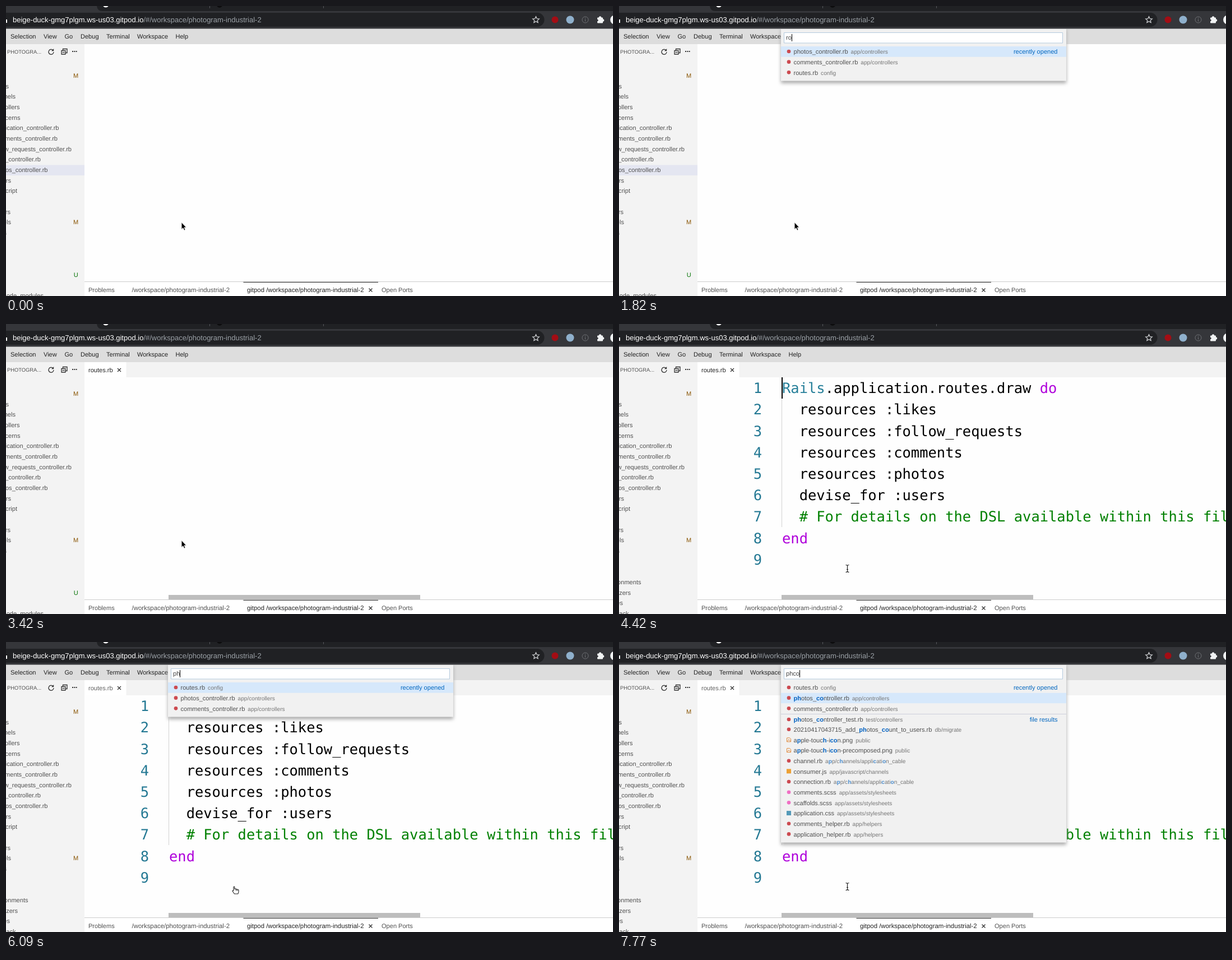
These frames come from a looping animation (1083x517 px, 8000 ms). An HTML page:

```html
<!DOCTYPE html>
<html lang="en">
<head>
<meta charset="utf-8">
<title>Quick open</title>
<style>
  html, body { margin: 0; width: 100%; height: 100%; overflow: hidden; background: #fff; }
  svg { display: block; }
  text { font: 11.06px "Liberation Sans", Arial, sans-serif; text-rendering: geometricPrecision; white-space: pre; }
  .end { text-anchor: end; }
  .menu { fill: #222; }
  .tree, .name { fill: #505050; }
  .desc { font-size: 10.12px; fill: #767676; }
  .hit { fill: #0060c0; font-weight: bold; }
  .desc .hit { fill: #4a8ccc; }
  .group { fill: #0066bf; text-anchor: end; }
  .path { font-size: 11.38px; }
  .url { font-size: 13px; fill: #9aa0a6; }
  .code { font: 25.46px "DejaVu Sans Mono", monospace; }
  .popup { filter: drop-shadow(0 4px 3.4px #a8a8a8); }
</style>
</head>
<body>
<svg id="stage" width="1083" height="517" viewBox="0 0 1083 517">
  <defs>
    <clipPath id="below"><path d="M0 41H1083V517H0z"/></clipPath>
    <clipPath id="side"><path d="M0 68H140V517H0z"/></clipPath>
    <path id="x" d="M-3-3L3 3M3-3L-3 3" stroke="#333" stroke-width="1.3"/>
  </defs>

  <!-- browser bar -->
  <path fill="#35363a" d="M0 0H1083V41H0z"/>
  <path fill="#202124" d="M168 0H1083V9H172Q163 9 162 0z"/>
  <circle cx="178" cy="-3" r="5.5" fill="#fff"/>
  <circle cx="381" cy="-2" r="5" fill="#0d0d0e"/>
  <path stroke="#55575b" d="M363.5 0V4M566.5 0V4"/>
  <path fill="#202124" d="M0 12H948A12.5 12.5 0 0 1 948 37H0z"/>
  <path fill="#fff" d="M0 24H2V30H0z"/>
  <text x="12" y="29" class="url"><tspan fill="#fff">beige-duck-gmg7plgm.ws-us03.gitpod.io</tspan>/#/workspace/photogram-industrial-2</text>
  <path fill="none" stroke="#d5d7da" stroke-width="1.2" d="M945.500 18.700l1.700 3.800 4.100.400-3.100 2.700.9 4-3.600-2.100-3.600 2.100.9-4-3.100-2.700 4.100-.4z"/>
  <circle cx="979.500" cy="24.500" r="6" fill="#a30d14"/>
  <circle cx="1006.500" cy="24.500" r="7" fill="#8fb0cc"/>
  <g fill="none" stroke="#707276"><circle cx="1033.500" cy="24.500" r="5.500"/><path d="M1033.500 23.500V27.500M1033.500 21V22.200"/></g>
  <g fill="#f1f3f4"><rect x="1055" y="20.500" width="10" height="10" rx="1"/><circle cx="1060" cy="20.500" r="2.200"/><circle cx="1065" cy="25.500" r="2.200"/><circle cx="1086" cy="24.500" r="8"/></g>
  <circle cx="1055" cy="25.500" r="1.700" fill="#35363a"/>

  <!-- workbench -->
  <path fill="#ddd" d="M0 40.500H1083V68H0z"/>
  <g id="menu"></g>
  <path fill="#f3f3f3" d="M0 68H140V517H0z"/>
  <path fill="#fefefe" d="M140 68H1083V517H140z"/>
  <g id="tree" clip-path="url(#side)">
    <path id="picked" fill="#e4e6f1" d="M0 283.500H140V302H0z"/>
    <text x="2" y="85" class="tree" style="font-size:9.350px">PHOTOGRA...</text>
    <g fill="none" stroke="#333" stroke-width="1.300">
      <path d="M83.500 78.500A4.500 4.500 0 1 0 85 82"/>
      <path d="M99 79.500H106V86H99zM101.500 79V76.500H109V83.500H106.500M100.500 82.700H104.500"/>
    </g>
    <path fill="#333" d="M85.200 76V80.300H81zM118 80h2v2h-2zM121.300 80h2v2h-2zM124.600 80h2v2h-2z"/>
  </g>
  <g id="editor">
    <path fill="#f3f3f3" d="M140 68H1083V95H140z"/>
    <path fill="#fff" d="M140 68H214.500V95H140z"/>
    <text id="tab" x="147" y="86">routes.rb</text>
    <use href="#x" x="202" y="82"/>
    <g id="code"><path stroke="#d3d3d3" d="M290.500 133V362"/></g>
    <path id="caret" d="M290 95H292V133H290z"/>
    <path id="scroll" fill="#bdbdbd" d="M290 483H739V491H290z"/>
  </g>
  <path fill="#fff" d="M140 492H1083V517H140z"/>
  <path stroke="#ccc" d="M140 491.500H1083"/>
  <path stroke="#333" d="M423.500 492.500H664"/>
  <g id="panel"></g>
  <use href="#x" x="650.500" y="506.500"/>

  <g clip-path="url(#below)"><g id="popup"></g></g>

  <g id="arrow" transform="translate(313 386)">
    <path stroke="#fff" d="M0-.500V12.500L2.900 9.700 4.900 14.200 7.100 13.200 5.100 8.900H9z"/>
  </g>
  <g id="beam" fill="none">
    <path id="stem" stroke="#fff" stroke-width="3" d="M-3-6.500Q0-6.500 0-4.500Q0-6.500 3-6.500M0-5V5M-3 6.500Q0 6.500 0 4.500Q0 6.500 3 6.500M-1.500 1.500H1.500"/>
    <path stroke="#222" stroke-width="1.200" d="M-3-6.500Q0-6.500 0-4.500Q0-6.500 3-6.500M0-5V5M-3 6.500Q0 6.500 0 4.500Q0 6.500 3 6.500M-1.500 1.500H1.500"/>
  </g>
  <g id="hand" transform="translate(409.500 442)">
    <path fill="#fff" stroke="#222" stroke-width="1.100" stroke-linejoin="round" d="M-3.500 1.500V-5Q-2.500-7-1.500-5V-1.500Q0-2.800 1-1.200Q2.400-2.200 3.300-.600Q5.500-1.200 5.500 1V3.500Q5.300 5 4.300 7H-2L-5.500 2Q-5.500.300-3.500 1.500M1-1V1.500M3.300-.500V1.500"/>
  </g>
</svg>
<script>
const LOOP = 8000, ROW = 18.67;
const $ = id => document.getElementById(id);
const text = (x, y, s, cls = '', extra = '') => `<text x="${x}" y="${y}" class="${cls}" ${extra}>${s}</text>`;
const add = (id, html) => $(id).insertAdjacentHTML('beforeend', html);
const show = (id, on) => $(id).style.display = on ? '' : 'none';
// value of the last step that has begun
const at = (t, steps) => steps.reduce((v, s) => t >= s[0] ? s[1] : v, steps[0][1]);

// menu, bottom panel
[[8, 'Selection'], [67, 'View'], [104.5, 'Go'], [133, 'Debug'], [179, 'Terminal'], [234, 'Workspace'], [302.5, 'Help']]
  .forEach(([x, s]) => add('menu', text(x, 58, s, 'menu')));
add('panel', text(147, 510, 'Problems', 'tree')
  + text(224.5, 510, '/workspace/photogram-industrial-2', 'tree path')
  + text(430, 510, 'gitpod /workspace/photogram-industrial-2', 'menu path')
  + text(670, 510, 'Open Ports', 'tree'));

// file tree: row, right edge, label
const branch = rows => rows.map(([i, x, s]) => text(x, 128 + i * ROW, s, 'tree end')).join('');
const mark = (i, s, color) => text(124.7, 128 + i * ROW, s, '', `text-anchor="middle" fill="${color}"`);
add('tree', branch([[1, 5, 'assets'], [2, 17, 'channels'], [3, 24.5, 'controllers'], [4, 25.5, 'concerns'],
  [5, 94.5, 'application_controller.rb'], [6, 92, 'comments_controller.rb'], [7, 117, 'follow_requests_controller.rb'],
  [8, 62, 'likes_controller.rb'], [9, 74.5, 'photos_controller.rb'], [10, 9, 'helpers'], [11, 20, 'javascript'],
  [13, 8, 'mailers'], [14, 9, 'models'], [15, 1, 'views']])
  + mark(0, 'M', '#895503') + mark(14, 'M', '#895503')
  + `<g id="shut">${branch([[21, 67, 'node_modules']])}${mark(19, 'U', '#007100')}</g>`
  + `<g id="open">${branch([[18, 39.5, 'environments'], [19, 21, 'initializers'], [20, 7, 'locales'], [21, 17.5, 'webpack']])}</g>`);

// code
const ink = (color, s) => `<tspan fill="${color}">${s}</tspan>`;
[ink('#267f99', 'Rails') + '.application.routes.draw ' + ink('#af00db', 'do'),
  '  resources :likes', '  resources :follow_requests', '  resources :comments', '  resources :photos',
  '  devise_for :users', ink('#008000', '  # For details on the DSL available within this file, see'),
  ink('#af00db', 'end'), ''].forEach((line, i) => {
  const y = 123.2 + i * 38.19;
  add('code', text(255, y, i + 1, 'code end', 'fill="#237893"') + text(291, y, line, 'code'));
});

// popup rows: icon, name, folder; stars enclose matched letters
const ctl = 'app/controllers', css = 'app/assets/stylesheets', help = 'app/helpers';
const photos = 'r photos_controller.rb ' + ctl, comments = 'r comments_controller.rb ' + ctl, routes = 'r routes.rb config';
const cable = 'a*p*p/c*h*annels/appli*c*ation_cable', cableCo = 'a*p*p/c*h*annels/appli*c*ati*o*n_cable';
const lists = {
  first: [photos, comments, routes],
  rout: [photos, comments, 'r *rout*es.rb config', 'r p*ro*d*u*c*t*ion.rb config/environments',
    'j p*ro*d*u*c*t*ion.js config/webpack', 'r 20210417042205_c*r*eate_f*o*llow_req*u*es*t*s.rb db/migrate',
    'r 20210415144947_c*r*eate_f*o*llow_req*u*es*t*s.rb public/example_migrations',
    'y follow_requests.yml test/fixtures', 'r follow_requests_helper.rb ' + help,
    'r content_security_policy.rb config/initializers', 'r follow_requests_controller.rb ' + ctl,
    'b _follow_request.json.jbuilder app/views/follow_requests',
    'r follow_requests_controller_test.rb test/controllers', 'r 20210417043715_add_photos_count_to_users.rb db/migrate'],
  second: [routes, photos, comments],
  ph: [routes, 'r *ph*otos_controller.rb ' + ctl, comments, 's *ph*otos.scss ' + css, 'r *ph*oto.rb app/models',
    'y *ph*otos.yml test/fixtures', 'r *ph*otos_helper.rb ' + help, 'r *ph*otos_controller_test.rb test/controllers',
    'r *ph*oto_test.rb test/models', 'r 20210417043715_add_*ph*otos_count_to_users.rb db/migrate',
    'i a*p*ple-touc*h*-icon.png public', 'i a*p*ple-touc*h*-icon-precomposed.png public',
    'r channel.rb a*p*p/c*h*annels/application_cable', 'r connection.rb a*p*p/c*h*annels/application_cable',
    's likes.scss ' + css, 's comments.scss ' + css, 's scaffolds.scss ' + css, 'c application.css ' + css,
    'r comments_helper.rb ' + help, 'r application_helper.rb ' + help],
  phc: [routes, 'r *ph*otos_*c*ontroller.rb ' + ctl, comments, 's *ph*otos.s*c*ss ' + css,
    'r *ph*otos_*c*ontroller_test.rb test/controllers', 'r 20210417043715_add_*ph*otos_*c*ount_to_users.rb db/migrate',
    'i a*p*ple-touc*h*-i*c*on.png public', 'i a*p*ple-touc*h*-i*c*on-precomposed.png public',
    's likes.scss ' + css, 'r channel.rb ' + cable, 'j consumer.js app/javascript/channels', 'r connection.rb ' + cable,
    's comments.scss ' + css, 's scaffolds.scss ' + css, 'c application.css ' + css, 'r comments_helper.rb ' + help,
    's follow_requests.scss ' + css, 'r application_helper.rb ' + help],
  phco: [routes, 'r *ph*otos_*co*ntroller.rb ' + ctl, comments, 'r *ph*otos_*co*ntroller_test.rb test/controllers',
    'r 20210417043715_add_*ph*otos_*co*unt_to_users.rb db/migrate', 'i a*p*ple-touc*h*-i*co*n.png public',
    'i a*p*ple-touc*h*-i*co*n-precomposed.png public', 'r channel.rb ' + cableCo, 'j consumer.js app/javascript/channels',
    'r connection.rb ' + cableCo, 's comments.scss ' + css, 's scaffolds.scss ' + css, 'c application.css ' + css,
    'r comments_helper.rb ' + help, 'r application_helper.rb ' + help]
};
const dot = color => `<circle r="3.3" fill="${color}"/>`;
const box = color => `<path fill="${color}" d="M-4-4H4V4H-4z"/>`;
const icons = {
  r: dot('#cc4a50'), b: dot('#8f2530'), s: dot('#f06fc4'), j: box('#eda033'), c: box('#5499b8'),
  y: '<path stroke="#cc4a50" stroke-width="1.6" d="M-3.5-3H3.500M-3.500-.300H3.500M-3.500 2.500H3.500"/>',
  i: '<path fill="none" stroke="#e0893a" d="M-3-3.500H1.500L3.500-1.500V3.500H-3.500V-3.500M-2.500 2.500L0-.500 2.500 2.500"/>'
};
const rich = s => s.split('*').map((p, i) => i % 2 ? `<tspan class="hit">${p}</tspan>` : p).join('');

function row(spec, i) {
  const [icon, name, folder] = spec.split(' ');
  const y = 81.3 + i * ROW + (i === 3 ? 1 : 0);
  return `<g transform="translate(303 ${y - .3})">${icons[icon]}</g>`
    + text(311.5, y + 3.9, `${rich(name)}<tspan class="desc" dx="5">${rich(folder)}</tspan>`, 'name');
}

function popup(key, sel) {
  const rows = lists[key], bottom = 77.4 + rows.length * ROW;
  const grouped = rows.length > 3;
  return `<path class="popup" fill="#f1f1f1" d="M289 38H798V${bottom}H289z"/>
    <path fill="#fff" stroke="#b3c9de" d="M294.500 47.500H791.500V66H294.500z"/>
    <path fill="#d6e8fb" d="M289 ${72 + sel * ROW}h509v${ROW}h-509z"/>`
    + rows.map(row).join('') + text(782.5, 85.2, 'recently opened', 'group')
    + (grouped ? '<path stroke="#cccedb" d="M289 128.500H798"/>' + text(782.5, 142.2, 'file results', 'group') : '')
    + text(298, 60.3, '', '', 'id="typed"') + '<path id="bar" d="M0 50H1V63H0z"/>';
}

const listAt = [[0, ''], [720, 'first'], [2360, 'rout'], [3010, ''], [4810, 'second'], [6210, 'ph'], [6380, 'phc'], [6970, 'phco']];
const typedAt = [[0, ''], [1720, 'r'], [1790, 'ro'], [1870, 'rou'], [1940, 'rout'], [3010, ''],
  [5860, 'p'], [6030, 'ph'], [6210, 'phc'], [6670, 'phco']];
const barAt = [[0, 1], [1170, 0], [1650, 1], [2470, 0], [2950, 1], [5320, 0], [5860, 1], [7170, 0], [7710, 1]];
const selAt = [[0, 0], [2360, 2], [3010, 0], [7770, 1]];
const caretAt = [[0, 0], [3500, 1], [3940, 0], [4420, 1], [4810, 0]];
const mouseAt = [[0, 'arrow'], [3600, 'beam'], [6090, 'hand'], [6470, 'beam']];

let shown = '';
function draw(t) {
  const key = at(t, listAt), sel = at(t, selAt), typed = at(t, typedAt), mouse = at(t, mouseAt);
  const state = key + sel + '/' + typed;
  if (state !== shown) {
    shown = state;
    $('popup').innerHTML = key && popup(key, sel);
    if (key) {
      const el = $('typed');
      el.textContent = typed || 'File name to search. (Press Cmd+P to show/hide ignored files)';
      el.setAttribute('fill', typed ? '#444' : '#767676');
      const x = typed ? 298 + el.getComputedTextLength() : 298;
      $('bar').setAttribute('transform', `translate(${Math.round(x)} 0)`);
    }
  }
  if (key) show('bar', at(t, barAt));

  show('editor', t >= 3420);
  show('code', t >= 3500);
  show('caret', at(t, caretAt));
  show('picked', t < 3420);
  show('shut', t < 3680);
  show('open', t >= 3680);
  $('tab').setAttribute('fill', t < 4810 ? '#222' : '#606060');
  $('scroll').style.opacity = t >= 6380 && t < 6530 ? .6 : 1;

  for (const id of ['arrow', 'beam', 'hand']) show(id, id === mouse);
  const p = Math.min(1, Math.max(0, (t - 3600) / 460)), e = 1 - (1 - p) ** 2;
  $('beam').setAttribute('transform', `translate(${313 + 94.5 * e} ${388 + 48 * e})`);
}

const start = performance.now();
function tick() {
  draw((performance.now() - start) % LOOP);
  requestAnimationFrame(tick);
}
tick();
</script>
</body>
</html>
```
